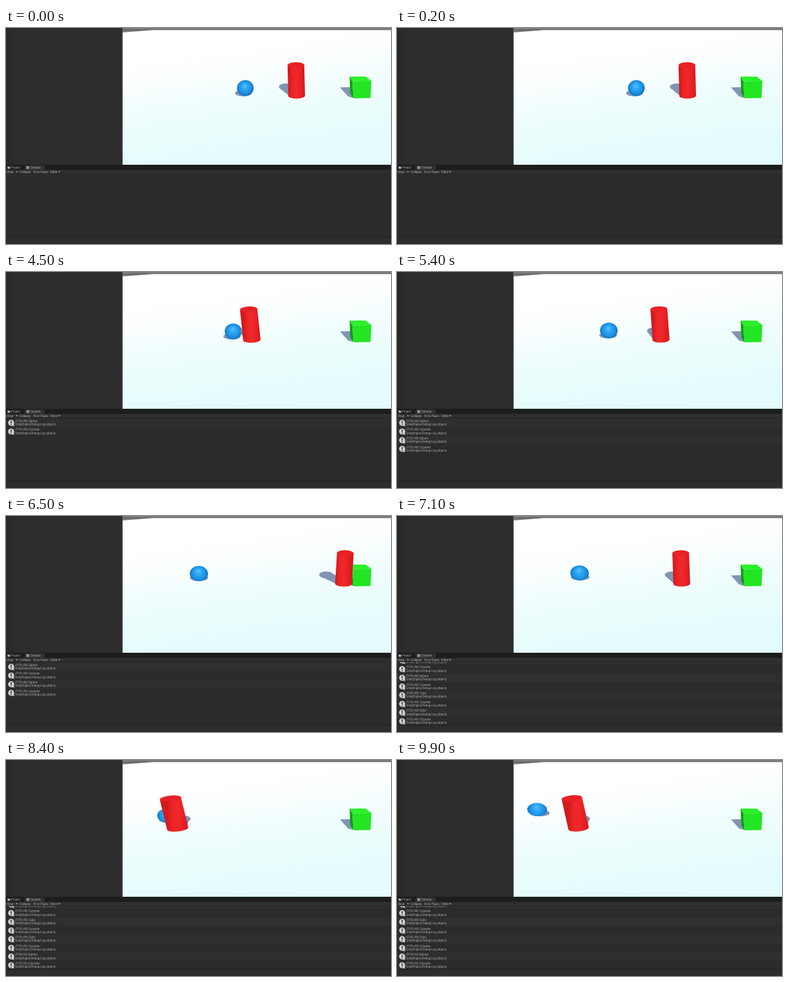
Write an HTML page with a canvas that moves like this. It is 600 px wide and 338 px high and loops after 10 s.

```html
<!DOCTYPE html>
<html lang="en">
<head>
<meta charset="utf-8">
<title>Collision log</title>
<style>
html, body { margin: 0; width: 100%; height: 100%; overflow: hidden; background: #2c2c2c; }
canvas { display: block; width: 100vw; height: 100vh; }
</style>
</head>
<body>
<canvas id="stage" width="600" height="338"></canvas>
<script>
const c = document.getElementById('stage').getContext('2d');
const LOOP = 10000, STEP = 100, ROW = 13.6, LIST_TOP = 229.3, LIST_END = 328;
const GREY = '#b9b9b9', SHADOW = '#8094b4';

// Legs of a move: time, x, power of the ease that leads there
const cylinderLegs = [
  [3400, 453], [3800, 398.5, 1.5], [4600, 381, 1], [6500, 526, 1.8],
  [6900, 528, 1], [8100, 263, .64], [8900, 283, 1.5]
];
const sphereLegs = [[3800, 373], [7700, 268.5, 1], [9900, 218.5, .9]];
const hits = [[3800, 'Sphere'], [4600, 'Sphere'], [6600, 'Cube'], [6900, 'Cube'], [8100, 'Sphere']];

function along(legs, t) {
  let [from, x] = legs[0];
  for (const [to, end, power] of legs.slice(1)) {
    const k = Math.min(1, Math.max(0, (t - from) / (to - from)));
    x += (end - x) * k ** power;
    if (t < to) break;
    from = to;
  }
  return x;
}

function rect(x, y, w, h, color) {
  c.fillStyle = color;
  c.fillRect(x, y, w, h);
}

function poly(color, ...p) {
  c.fillStyle = color;
  c.beginPath();
  for (let i = 0; i < p.length; i += 2) c.lineTo(p[i], p[i + 1]);
  c.closePath();
  c.fill();
}

function oval(x, y, rx, ry, color, turn = 0) {
  c.fillStyle = color;
  c.beginPath();
  c.ellipse(x, y, rx, ry, turn, 0, Math.PI * 2);
  c.fill();
}

function text(s, x, y) {
  c.font = '4.2px Inter, sans-serif';
  c.fillStyle = GREY;
  c.fillText(s, x, y);
}

function fade(g, ...colors) {
  colors.forEach((color, i) => g.addColorStop(i / (colors.length - 1), color));
  return g;
}

function ground() {
  rect(181.5, 0, 419, 214, fade(c.createLinearGradient(370, 0, 400, 214),
    '#ffffff', '#fdffff', '#f1fdfe', '#e8fcfc', '#e3fbfb'));
  poly(fade(c.createLinearGradient(0, 0, 0, 7), '#858585', '#666666', '#8a8a8a'),
    181.5, 0, 600, 0, 600, 3.2, 228, 3.2, 181.5, 7);
}

function cube() {
  poly(SHADOW, 520.5, 93, 536, 92.5, 541, 109.5, 533, 107);
  poly('#0f9f12', 535.5, 76, 540, 83.5, 541.5, 110, 536.5, 102);
  poly('#2af02a', 535.5, 76, 560.5, 76, 569.5, 83, 540, 83.5);
  poly('#23e523', 540, 83.5, 569.5, 83, 568, 109.5, 541.5, 110);
}

// Wide-angle view: shapes stretch and lean as they near the left edge
function sphere(x) {
  const d = 373 - x, y = 94 - d * .055 - Math.max(0, d - 123) * .25;
  const rx = 13 + d * .016, ry = 12.5 - d * d * 9e-5;
  oval(x - 3 + d * .045, y + 8 - d * .016, rx, 5, SHADOW);
  const shade = c.createRadialGradient(x - 1, y - 4, 1, x, y, rx + 1);
  oval(x, y, rx, ry, fade(shade, '#4fbcfb', '#2aa4f3', '#1d90e2', '#1268ad'), .06);
}

function cylinder(x) {
  const d = Math.max(0, 453 - x) ** 2, lean = (475 - x) * .055, r = 13 + d * 1e-4;
  const top = 58 + d * 6e-5, foot = 106 + d * 4e-5, tx = x - lean;
  const turn = -lean / 100, rise = Math.sin(turn) * r;

  const sx = x - .14 * (x - 333);
  oval(sx, 92, 11, 5.2, SHADOW);
  poly(SHADOW, sx - 10.5, 93.5, sx + 10.5, 90.5, x + 12, foot, x - 12, foot);

  const body = fade(c.createLinearGradient(x - r, 0, x + r, 0),
    '#d3191c', '#ec2427', '#f0282a', '#e62124', '#d41a1d');
  oval(x, foot, r, 4.5, body, turn);
  poly(body, tx - r, top - rise, tx + r, top + rise, x + r, foot + rise, x - r, foot - rise);
  oval(tx, top, r, 4.4, '#e82226', turn);
}

function logRow(y, i) {
  const [time, thing] = hits[i >> 1];
  const second = 46 + Math.floor(time / 1750);
  rect(0, y, 600, ROW, i % 2 ? '#2b2b2b' : '#2f2f2f');
  oval(8, y + 6.7, 4.7, 4.7, '#d0d0d0');
  poly('#d0d0d0', 8, y + 10.7, 12.3, y + 7.2, 12.5, y + 12.2);
  rect(7.3, y + 3.6, 1.5, 4, '#303030');
  rect(7.3, y + 8.6, 1.5, 1.4, '#303030');
  text(`[17:55:${second}] ${i % 2 ? 'Cylynder' : thing}`, 14.2, y + 5.5);
  text('UnityEngine.Debug:Log (object)', 14.2, y + 10.7);
}

function arrow(x, y) {
  poly(GREY, x - 1.6, y - 1, x + 1.6, y - 1, x, y + 1);
}

function panels(t) {
  rect(0, 0, 181.5, 214, '#2d2d2d');
  rect(0, 0, 11, 214, '#2a2a2a');
  rect(0, 228, 600, 110, '#2b2b2b');

  const rows = hits.filter(h => h[0] <= t).length * 2;
  const scroll = Math.max(0, LIST_TOP + rows * ROW - LIST_END);
  for (let i = 0; i < rows; i++) {
    const y = LIST_TOP + i * ROW - scroll;
    if (y > LIST_TOP - ROW) logRow(y, i);
  }

  rect(0, 214, 600, 8, '#1d1d1d');
  rect(29, 215, 31, 7, '#333333');
  rect(0, 222, 600, 6.5, '#2f2f2f');
  rect(0, 228, 600, .5, '#222222');
  rect(0, 327, 600, 1, '#222222');
  rect(0, 328, 600, 10, '#2d2d2d');

  rect(2.5, 216.7, 2, 1, GREY);
  rect(2.5, 217.2, 4, 3, GREY);
  text('Project', 8, 219.8);
  rect(32, 216.5, 4, 4, GREY);
  rect(32.8, 217.6, 2.4, .6, '#333333');
  rect(32.8, 219, 2.4, .6, '#333333');
  text('Console', 37.8, 219.8);
  text('Clear', 1.2, 227);
  arrow(17, 225.3);
  text('Collapse', 21.3, 227);
  text('Error Pause', 42.8, 227);
  text('Editor', 69, 227);
  arrow(83, 225.3);
}

function draw(now) {
  const t = Math.floor(now % LOOP / STEP) * STEP;
  ground();
  cube();
  sphere(along(sphereLegs, t));
  cylinder(along(cylinderLegs, t));
  panels(t);
}

const start = performance.now();
function tick() {
  draw(performance.now() - start);
  requestAnimationFrame(tick);
}
tick();
</script>
</body>
</html>
```
